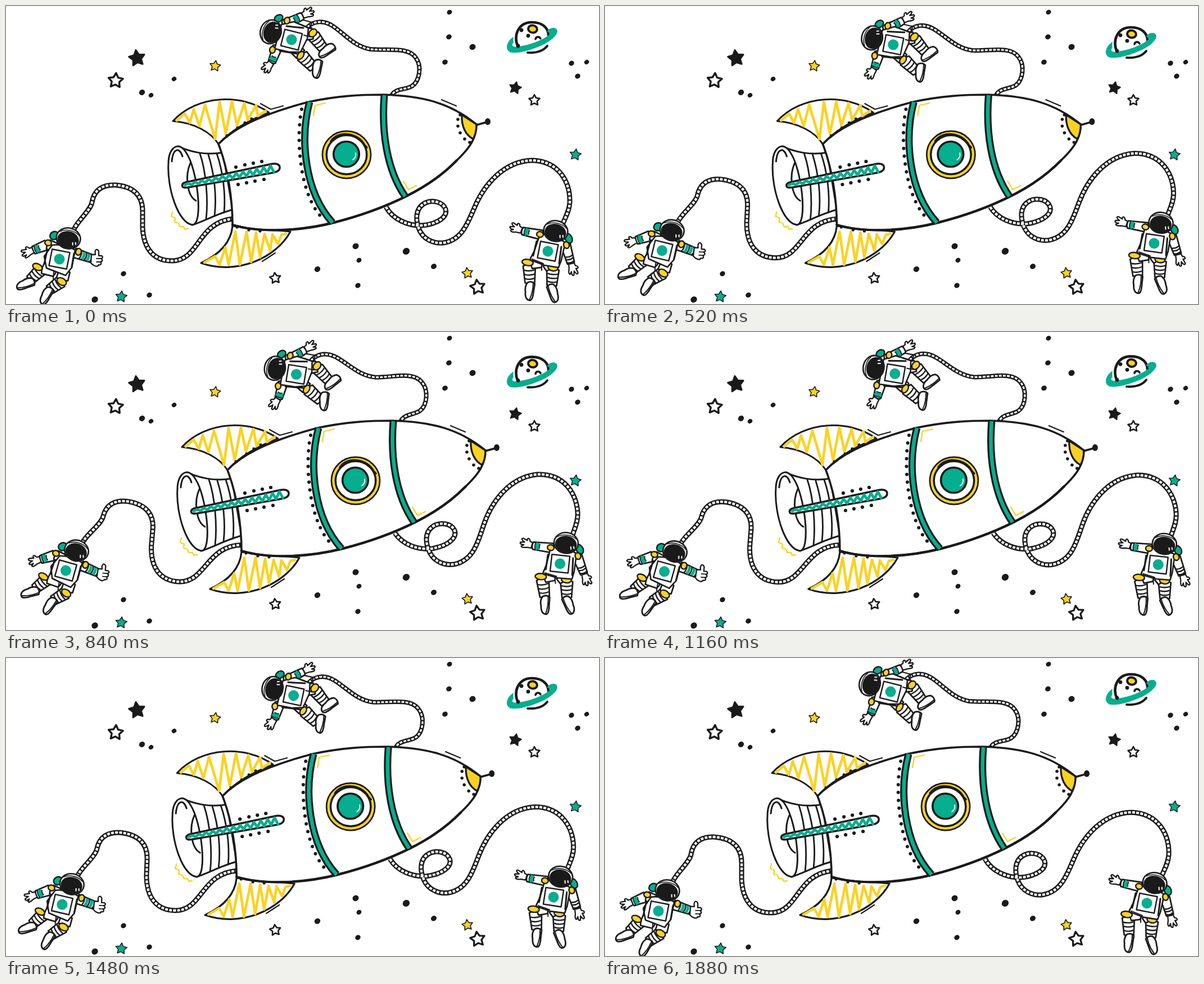
Recreate the animation shown at these times as an HTML page. Size 1055 by 531 pixels, loop 1.92 s.

```html
<!DOCTYPE html>
<html lang="en">
<head>
<meta charset="utf-8">
<title>Rocket and astronauts</title>
<style>
  html, body { margin: 0; width: 100%; height: 100%; overflow: hidden; background: #fff; }
  svg { display: block; width: 100vw; height: 100vh; }
</style>
</head>
<body>
<svg id="stage" viewBox="0 0 1055 531" stroke-linecap="round" stroke-linejoin="round"></svg>
<script>
const INK = '#1a1a1a', GREEN = '#05ae8e', YELLOW = '#fbd222', WHITE = '#fff';
const LOOP = 1920, STEP = 40;

const path = (d, w = 2.5, stroke = INK, fill = 'none', more = '') =>
  `<path d="${d}" fill="${fill}" stroke="${stroke}" stroke-width="${w}" ${more}/>`;
const oval = (x, y, rx, ry = rx, a = 0, fill = INK, w = 0) =>
  `<ellipse rx="${rx}" ry="${ry}" transform="translate(${x} ${y}) rotate(${a})" fill="${fill}" stroke="${INK}" stroke-width="${w}"/>`;
const place = (x, y, a, body, flip = 1) =>
  `<g transform="translate(${x} ${y}) rotate(${a}) scale(1 ${flip})">${body}</g>`;
const group = (id, body) => `<g id="${id}">${body}</g>`;
const dots = (list, r) => list.map(([x, y]) => oval(x, y, r)).join('');

function star(x, y, r, a, fill, w) {
  let d = '';
  for (let i = 0; i < 10; i++) {
    const q = (a + i * 36 - 90) * Math.PI / 180, k = i % 2 ? r * 0.52 : r;
    d += (i ? 'L' : 'M') + (x + k * Math.cos(q)).toFixed(1) + ' ' + (y + k * Math.sin(q)).toFixed(1);
  }
  return path(d + 'Z', w, INK, fill);
}

const rope = (d, w = 9) => path(d, w, INK, 'none', 'stroke-linecap="butt"') +
  path(d, w - 4.8, WHITE, 'none', 'stroke-linecap="butt" stroke-dasharray="4.8 2.4"');

// Tapered tube; marks are [position, colour, width] bands across it
function limb(x1, y1, x2, y2, a, b, marks = []) {
  const len = Math.hypot(x2 - x1, y2 - y1), ang = Math.atan2(y2 - y1, x2 - x1) * 180 / Math.PI;
  const bands = marks.map(([t, c = INK, w = 2.4]) => {
    const x = t * len, h = (a + (b - a) * t) / 2 - 1;
    return path(`M${x} ${-h}Q${x + 3} 0 ${x} ${h}`, w, c, 'none', 'stroke-linecap="butt"');
  }).join('');
  return place(x1, y1, ang,
    path(`M0 ${-a / 2}L${len} ${-b / 2}Q${len + 3} 0 ${len} ${b / 2}L0 ${a / 2}Q-6 0 0 ${-a / 2}Z`, 2.7, INK, WHITE) + bands);
}
const cuff = t => [[t, INK, 10], [t, GREEN, 6.5]];
const rings = (...t) => t.map(v => [v]);
const shin = (x1, y1, x2, y2) => limb(x1, y1, x2, y2, 22, 17, rings(.25, .5, .75));

const hand = (x, y, a, flip) => place(x, y, a, path(
  'M0-5L5-6C7-12 12-11 10-6L18-8C22-7 20-4 14-2L21 0C22 3 19 4 14 3L18 6C18 9 13 8 8 6L0 5Z', 2.3, INK, WHITE), flip);
const boot = (x, y, a, flip) => place(x, y, a, path(
  'M-8-6C-2-9 4-8 9-6C18-5 23-1 22 5C21 9 14 9 6 8L-9 7C-12 3-11-3-8-6Z', 2.8, INK, WHITE) +
  path('M-9 4C0 6 12 6 21 4', 2), flip);
const helmet = (x, y, a) => place(x, y, a,
  oval(0, 0, 21.5, 18.5, 0, WHITE, 2.6) + path('M-17-9C-8-16 8-16 17-9', 1.6) +
  oval(0, 2.5, 19.3, 15.2) + path('M9 6l1 4M14 5l1 3', 2, WHITE));
const patch = (x, y, rx, ry, a, c = YELLOW) => oval(x, y, rx, ry, a, c, 2.4);
const badge = (x, y, a) => place(x, y, a,
  path('M-16-15L16-15L16 15L-16 15Z', 2.4, INK, WHITE) + `<circle r="9.5" fill="${GREEN}"/>`);

const leftCrew =
  rope('M120 400C125 385 150 365 153 350C157 325 175 318 195 319C230 322 243 340 243 365L243 395C245 435 265 455 297 454C345 452 340 385 405 379') +
  patch(86, 409, 8, 7, -25, GREEN) +
  shin(62, 470, 43, 488) + boot(40, 493, 165, -1) + limb(86, 473, 66, 467, 18, 20) +
  shin(98, 491, 77, 506) + boot(74, 511, 125, -1) + limb(104, 472, 100, 487, 20, 21) +
  patch(56, 465, 9, 5.5, 25) + patch(99, 491, 9, 6, 30) +
  limb(72, 426, 49, 435, 18, 14, cuff(.68)) + limb(88, 430, 75, 425, 16, 17) + hand(48, 435, 156, -1) +
  limb(122, 440, 152, 450, 17, 14, [[.5, GREEN, 5], [.78, GREEN, 5], [.34], [.64], [.95]]) +
  path('M152 443L159 443C157 434 162 431 165 437L165 445L170 445C173 447 172 450 169 450C173 453 171 456 168 456C171 460 168 462 165 461C163 466 155 463 151 458Z', 2.3, INK, WHITE) +
  path('M161 450L169 450M161 456L168 456', 1.8) +
  path('M82 426C96 424 112 428 123 435L117 466L106 480L72 467L68 446Z', 2.6, INK, WHITE) +
  path('M73 437L68 459M121 441L117 465', 3) + patch(75, 422, 6, 5, 15) + patch(129, 438, 5, 6, 15) +
  badge(95, 451, 11) + path('M85 473L84 486M72 467L90 474', 2) + helmet(111, 414, 12);

const rightCrew =
  rope('M676 358C688 380 715 392 740 391C770 388 786 375 782 362C777 348 758 346 748 350C728 358 728 380 735 398C742 415 760 424 778 422C812 417 822 385 834 358C850 320 885 276 937 275C985 277 1004 315 1003 350C1002 365 996 375 991 387') +
  patch(1001, 414, 6, 9, -25, GREEN) +
  shin(931, 463, 932, 493) + boot(932, 502, 103, -1) + limb(951, 456, 935, 458, 20, 20) +
  shin(973, 470, 971, 498) + boot(972, 506, 66, 1) + limb(964, 458, 970, 466, 20, 21) +
  patch(928, 457, 10, 5.5, 10) + patch(973, 466, 9, 6, 12) +
  limb(953, 408, 919, 401, 17, 13, cuff(.75)) + hand(917, 400, 200, -1) +
  limb(996, 427, 1005, 458, 17, 13, rings(.6, .75, .93)) + hand(1006, 459, 78, 1) +
  path('M951 404C968 410 983 414 995 421L988 453L983 466L958 462L932 452L940 436Z', 2.6, INK, WHITE) +
  path('M944 419L938 445M988 429L984 459', 3) + patch(950, 407, 6, 5, 15) + patch(997, 426, 5, 6, -15) +
  badge(964, 437, 11) + path('M953 459L953 471M936 451L956 459', 2) + helmet(978, 401, 12);

const topCrew =
  rope('M536 38C548 26 565 25 582 36C605 52 620 72 648 77C680 80 715 72 729 92C741 108 735 135 722 143C710 150 690 146 685 162', 8) +
  patch(485, 22, 8, 6, -30, GREEN) +
  shin(547, 53, 564, 75) + boot(575, 76, 150, -1) + limb(530, 51, 545, 49, 20, 20) +
  shin(527, 89, 547, 110) + boot(554, 106, 106, -1) + limb(514, 76, 524, 86, 20, 20) +
  patch(546, 48, 8, 6, -45) + patch(524, 88, 5, 8, 35) +
  limb(495, 33, 527, 18, 17, 13, cuff(.65)) + hand(528, 17, -24, 1) +
  limb(483, 73, 473, 100, 17, 13, cuff(.75)) + hand(472, 101, 128, -1) +
  path('M490 33L512 28L538 39L536 58L524 82L504 82L478 76Z', 2.6, INK, WHITE) +
  path('M499 36L529 39M487 80L518 85', 3) + path('M525 33L541 40L544 29L529 25', 2.2) +
  patch(500, 26, 5, 6, 20) + patch(474, 78, 5, 6, 10) +
  badge(508, 60, 14) + path('M530 52L541 55', 2) + helmet(471, 46, -72);

const planet =
  `<circle cx="936" cy="57" r="28" fill="${WHITE}"/>` +
  path('M911 72C902 55 910 29 936 29C955 29 965 40 965 52', 4.6) + path('M928 83C944 84 956 80 963 71', 4) +
  path('M902 56L902 66C898 70 902 74 908 73C930 71 957 61 968 50C969 47 965 47 963 45C967 39 978 37 980 43C983 53 962 67 945 73C928 80 907 85 897 82C887 77 892 62 902 56Z', 1, GREEN, GREEN) +
  oval(937, 41, 8, 6.5, 10, YELLOW, 4) + dots([[917, 43], [929, 53], [911, 71]], 3.4) +
  path('M942 59C943 54 949 54 951 58', 3.6);

const zig = s => path('M' + s, 4.6, YELLOW);
let teeth = 'M318 319';
for (let i = 1; i <= 26; i++) {
  const x = 318 + i * 6.1, h = 1.5 + i * .18;
  teeth += `L${x} ${319 - (x - 318) * .186 + (i % 2 ? -h : h)}`;
}
const band = d => path(d, 13, INK, 'none', 'stroke-linecap="butt"') + path(d, 6.5, GREEN, 'none', 'stroke-linecap="butt"');

const rocket =
  path('M297 205C340 158 420 155 468 190C430 204 400 222 378 246C365 225 335 208 297 205Z', 3, INK, WHITE) +
  zig('304 204L318 192L327 208L334 184L344 214L354 176L372 237L380 171L391 228L402 170L411 213L424 173L430 203L445 177L448 196L462 187') +
  path('M506 402C480 450 410 480 347 458C375 445 400 425 403 392Z', 3.2, INK, WHITE) +
  zig('353 457L372 446L380 461L390 430L396 461L408 402L416 461L428 402L436 456L445 404L452 448L460 406L470 436L474 407L484 424L490 408L498 406') +
  path('M307 250C325 259 355 267 386 261L403 363C375 370 350 385 331 390Z', 3, INK, WHITE) +
  path('M289 280C289 250 309 240 321 262C340 290 352 387 332 390C307 388 286 325 289 280Z', 3, INK, WHITE) +
  path('M295 277C297 253 309 251 314 268', 3) + path('M328 280C318 302 322 338 338 347', 3) +
  path('M345 263C356 295 360 345 356 380M360 265C371 300 375 340 371 374M375 263C386 295 391 335 388 368', 2.8) +
  path('M378 246C400 223 440 197 538 171C590 160 630 158 672 158C740 160 790 172 837 211C837 235 826 252 802 275C775 303 740 325 712 339C670 360 630 374 583 386C520 402 450 404 403 390C403 345 395 290 378 246Z', 3.6, INK, WHITE) +
  path('M802 275C775 303 740 325 712 339C670 360 630 374 583 386C520 402 450 404 403 390', 4.4) +
  dots([[393, 231], [412, 217], [425, 208], [437, 201]], 2.6) + dots([[411, 394], [432, 399], [452, 401]], 2.6) +
  path('M526 184C516 230 520 340 567 382', 6, INK, 'none', 'stroke-dasharray="0 14"') +
  band('M540 171C523 235 530 330 581 386') + band('M673 159C668 220 676 290 710 339') +
  path('M547 195L550 177L568 173M707 312L716 327L730 320', 2.3, YELLOW) +
  oval(606, 265, 39.2, 38.2, 0, WHITE, 10.4) +
  `<ellipse cx="606" cy="265" rx="39.6" ry="38.6" fill="none" stroke="${YELLOW}" stroke-width="4.2"/>` +
  path('M578 241C592 221 627 226 638 248L642 252', 3.6) +
  oval(605.5, 264, 22.8, 22.5, 0, GREEN, 3.6) + path('M622 262C623 267 621 272 617 274', 1.8, WHITE) +
  path('M314 322C312 317 316 315 320 314L470 282C482 279 488 283 487 289C486 295 480 296 470 298L325 323C318 324 315 324 314 322Z', 3.5, INK, WHITE) +
  path(teeth, 4.8, GREEN) +
  dots([[409, 287], [425, 283], [440, 280], [455, 277], [413, 318], [428, 315], [443, 312], [459, 309]], 3.1) +
  path('M811 194L837 211C837 222 835 230 831 237C818 230 810 215 811 194Z', 3.2, INK, YELLOW) +
  dots([[808, 194], [804, 202], [804, 214], [808, 226], [816, 237], [825, 243]], 2.8) +
  path('M837 212L855 207', 3.6) + oval(857, 206, 5, 6) +
  path('M453 174L471 184L493 178M775 167L801 178M456 455L479 440', 2.2) +
  path('M296 367L294 375L301 378L300 385L307 387L309 393L316 393L318 398L324 397', 2.3, YELLOW);

const specks = [[299, 130, 4], [242, 154, 5], [258, 159, 4], [789, 11, 4.3], [788, 55, 4.6], [830, 73, 5.3],
  [781, 100, 4.6], [1006, 102, 4.5], [1033, 100, 4], [1017, 125, 4.5], [622, 428, 5.3], [628, 453, 4.2], [554, 469, 5],
  [712, 437, 6], [761, 464, 4.8], [626, 498, 4.5], [209, 477, 4.5], [158, 523, 5.5], [255, 515, 4.5]]
  .map(([x, y, r]) => oval(x, y, r + .4, r - .2, -35)).join('');
const stars = star(233, 93, 14.5, -8, INK, 3) + star(195, 133, 13.5, 4, WHITE, 3.4) + star(372, 107, 10, 8, YELLOW, 1.6) +
  star(906, 146, 11, 12, INK, 2) + star(940, 168, 10, 0, WHITE, 2.6) + star(479, 485, 10, -6, WHITE, 2.6) +
  star(821, 476, 10, -8, YELLOW, 1.7) + star(839, 501, 13.5, -8, WHITE, 3.3) + star(205, 518, 10.5, 6, GREEN, 1.5);

const stage = document.getElementById('stage');
stage.innerHTML = specks + stars + group('planet', planet) + group('left', leftCrew) + group('right', rightCrew) +
  group('top', topCrew) + group('rocket', rocket) + star(1013, 265, 10.5, 8, GREEN, 1.5);

const move = (id, value) => document.getElementById(id).setAttribute('transform', value);

function draw(ms) {
  const t = Math.floor(ms % LOOP / STEP) * STEP;
  const s = (1 - Math.cos(2 * Math.PI * t / LOOP)) / 2;
  const x = 16.6 * s, turn = 5 * s;
  move('rocket', `translate(${x} 0)`);
  move('left', `translate(${x} 0) rotate(${turn} 402 384)`);
  move('right', `translate(${x} 0) rotate(${-turn} 680 358)`);
  move('top', `translate(${x} 0) rotate(${-turn} 688 157)`);
  move('planet', `translate(0 ${16 * s})`);
}

let start;
function tick(now) {
  start ??= now;
  draw(now - start);
  requestAnimationFrame(tick);
}
draw(0);
requestAnimationFrame(tick);
</script>
</body>
</html>
```
